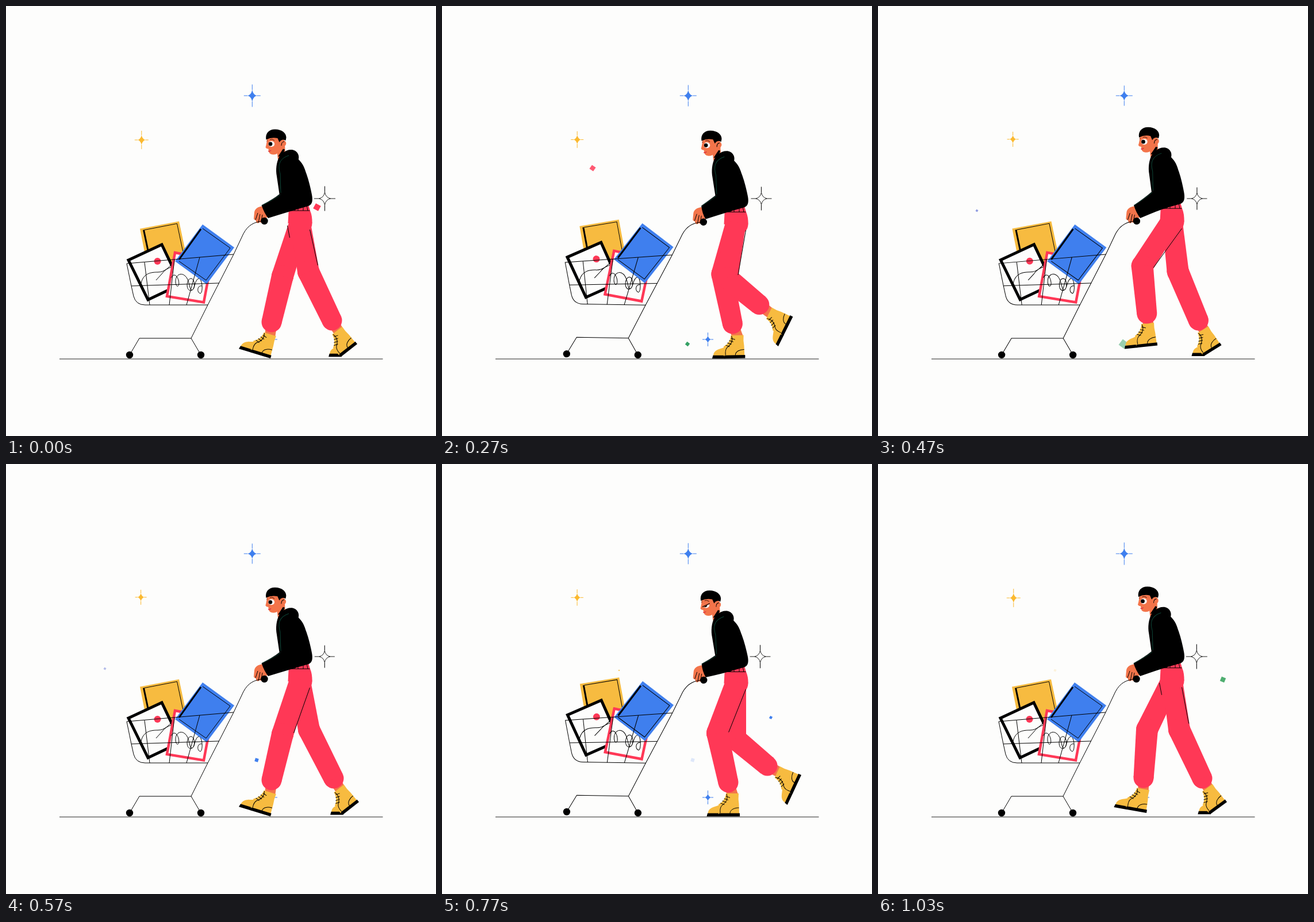
Recreate the animation shown at these times as an HTML page with a canvas. Size 748 px wide and 748 px high, loop 1.06 s.

```html
<!DOCTYPE html>
<html lang="en">
<head>
<meta charset="utf-8">
<title>Walking with a cart</title>
<style>
html, body { margin: 0; width: 100%; height: 100%; overflow: hidden; background: #fdfdfc; }
canvas { display: block; width: 748px; height: 748px; }
</style>
</head>
<body>
<canvas id="stage" width="748" height="748"></canvas>
<script>
const ctx = document.getElementById('stage').getContext('2d');
const LOOP = 1060, FRAMES = 32, STEP = LOOP / FRAMES;
const PAPER = '#fdfdfc', INK = '#000', RED = '#ff3856', BLUE = '#3f7fee',
      YELLOW = '#f7bb40', SKIN = '#f3744a', GREEN = '#35a164', TEAL = '#0d4436';

// Leg cycle: phase, knee x y, cuff x y, heel x y, sole angle
const LEG = [
  [0, 526, 462, 567, 547, 611, 588, -38],
  [1, 527, 462, 570, 547, 614, 588, -38],
  [5, 532, 472, 596, 541, 650, 563, -60],
  [7, 510, 478, 566, 525, 625, 541, -65],
  [11, 455, 441, 510, 509, 561, 540, -50],
  [12, 450, 438, 495, 511, 541, 549, -43],
  [15, 468, 462, 462, 546, 467, 607, 10],
  [16, 481, 470, 462, 550, 460, 613, 17],
  [17, 481, 470, 462, 550, 460, 613, 17],
  [21, 465, 466, 480, 553, 499, 613, 0],
  [23, 479, 468, 498, 554, 518, 613, 0],
  [27, 512, 458, 527, 547, 557, 606, -13],
  [28, 516, 460, 538, 547, 570, 600, -20],
  [31, 524, 462, 564, 547, 607, 588, -36]
];
// Step cycle: phase, body drop, cart push, load lift
const BODY = [
  [0, 0, 0, 0], [1, .3, 0, 0], [5, 10.5, 1, -.6], [7, 5.5, .95, -2.3],
  [11, -7, .5, -.5], [12, -8.3, .35, -.3], [15, -1.3, 0, 0]
];
// Confetti: birth, x, y, half size, turn, colour
const BITS = [
  [-2, 541, 350, 5, .5, RED], [3, 262, 282, 4, .6, RED], [7, 427, 588, 6, .65, GREEN],
  [11, 172, 356, 1.8, .6, '#8f9be0'], [14, 436, 515, 3, .3, BLUE], [19, 572, 441, 2.3, .5, BLUE],
  [22, 308, 359, 2, .4, YELLOW], [28, 600, 375, 4, .4, '#4fae70']
];

// Periodic monotone cubic interpolation
function sample(keys, period, at) {
  const n = keys.length;
  const key = (i, j) => {
    const lap = Math.floor(i / n), row = keys[i - lap * n];
    return j ? row[j] : row[0] + lap * period;
  };
  const slope = (i, j) => (key(i + 1, j) - key(i, j)) / (key(i + 1, 0) - key(i, 0));
  const tangent = (i, j) => {
    const a = slope(i - 1, j), b = slope(i, j);
    return a * b > 0 ? 2 * a * b / (a + b) : 0;
  };
  at %= period;
  let i = n - 1;
  while (keys[i][0] > at) i--;
  const h = key(i + 1, 0) - key(i, 0), s = (at - key(i, 0)) / h, q = 1 - s;
  return keys[0].slice(1).map((_, k) => {
    const j = k + 1;
    return key(i, j) * (1 + 2 * s) * q * q + key(i + 1, j) * (3 - 2 * s) * s * s
      + h * s * q * (q * tangent(i, j) - s * tangent(i + 1, j));
  });
}

function fill(d, color) {
  ctx.fillStyle = color;
  ctx.fill(new Path2D(d));
}
function line(d, width = 1, color = INK) {
  ctx.strokeStyle = color;
  ctx.lineWidth = width;
  ctx.stroke(new Path2D(d));
}
function dot(x, y, r, color = INK) {
  ctx.fillStyle = color;
  ctx.beginPath();
  ctx.arc(x, y, r, 0, 7);
  ctx.fill();
}
function group(draw) {
  ctx.save();
  draw();
  ctx.restore();
}

// Tapered limb with round ends
function limb(x1, y1, r1, x2, y2, r2, color) {
  const a = Math.atan2(y2 - y1, x2 - x1) + Math.PI / 2, c = Math.cos(a), s = Math.sin(a);
  dot(x1, y1, r1, color);
  dot(x2, y2, r2, color);
  fill(`M${x1 + c * r1},${y1 + s * r1}L${x2 + c * r2},${y2 + s * r2}
    L${x2 - c * r2},${y2 - s * r2}L${x1 - c * r1},${y1 - s * r1}Z`, color);
}

// Concave four-point body with thin rays
function star(x, y, w, h, color, outline) {
  const bw = w * .55, bh = h * .52, k = 1.6;
  const body = `M${x},${y - bh}Q${x + k},${y - k} ${x + bw},${y}Q${x + k},${y + k} ${x},${y + bh}
    Q${x - k},${y + k} ${x - bw},${y}Q${x - k},${y - k} ${x},${y - bh}Z`;
  const rays = `M${x},${y - h}V${y - bh}M${x},${y + bh}V${y + h}
    M${x - w},${y}H${x - bw}M${x + bw},${y}H${x + w}`;
  line(rays, outline ? 1.2 : 1, color);
  if (outline) line(body, 1, color);
  else fill(body, color);
}

function sparkles(f) {
  const a = f / FRAMES * 2 * Math.PI, c = Math.cos(a), s = Math.sin(a);
  star(428.3, 156, 14.5, 18.5 + c, BLUE);
  star(235.2 + c * .6, 232.4 + c * .6, 11 + c, 14.5 + c * 1.5, '#fbb92f');
  star(462.5, 580, 9.5, 12, BLUE);
  star(554.5 + s, 335, 18 + c * .5, 20.5 + c, '#222', true);
}

function confetti(f) {
  for (const [birth, x, y, r, turn, color] of BITS) {
    const age = f - birth;
    if (age <= 0 || age >= 10) continue;
    group(() => {
      ctx.globalAlpha = Math.min(1, (10 - age) / 6);
      ctx.translate(x, y);
      ctx.rotate(turn);
      ctx.scale(Math.min(1, age / 2), Math.min(1, age / 2));
      ctx.fillStyle = color;
      ctx.fillRect(-r, -r, 2 * r, 2 * r);
    });
  }
}

// Origin at the heel; the toe cap hinges at x = -36
function shoe(x, y, angle, bend) {
  group(() => {
    ctx.translate(x, y);
    ctx.rotate(angle);
    group(() => {
      ctx.translate(-36, 0);
      ctx.rotate(bend);
      fill('M3,-4V-21C-6,-16 -19,-17 -19.5,-4Z', YELLOW);
      fill('M2,-5.5H-20L-21.5,0H1Z', INK);
    });
    fill('M-1,-4L-1.5,-22Q-3,-30 -2,-40L-24,-40C-25,-32 -29,-25 -37,-21V-4Z', YELLOW);
    fill('M0,-5.5H-36V0H0Z', INK);
    line('M-17,-5C-17,-12 -9,-15 -1.5,-15M-23,-39C-20,-30 -24,-24 -31,-19Q-35,-15 -34,-6');
    for (let i = 0; i < 4; i++) line(`M${-24 - i * 3.2},${-35 + i * 4}l7,2.5`);
  });
}

function leg(phase, drop, near) {
  const [kx, ky, cx, cy, hx, hy, deg] = sample(LEG, FRAMES, phase);
  const angle = deg * Math.PI / 180, hipY = 374 + drop * .7;
  const planted = phase > 20 ? 1 : Math.max(0, Math.min(1, (5 - phase) / 4));
  const c = Math.cos(angle), s = Math.sin(angle);
  limb(cx, cy, 10, hx - 12 * c + 37 * s, hy - 12 * s - 37 * c, 9, SKIN);
  shoe(hx, hy, angle, -angle * planted);
  limb(511.5, hipY, 17.5, kx, ky, 19, RED);
  limb(kx, ky, 19, cx, cy, 17.5, RED);
  if (!near) return;
  const len = Math.hypot(kx - 511.5, ky - hipY), ux = (kx - 511.5) / len, uy = (ky - hipY) / len;
  line(`M528.5,${389 + drop * .5}L${kx + uy * 18 - ux * 8},${ky - ux * 18 - uy * 8}`);
  if (kx > 505) line(`M489.5,${382 + drop}L493.5,${403 + drop}`);
}

function head(drop) {
  fill('M471,250L473,267L486,260L485,240Z', SKIN);
  fill('M473,262L482,248.5L485,249.5Q483,257 478,261Z', INK);
  fill('M454,226C454,236 453,241 451.5,246Q453,248.5 456.5,248.5Q456,258 464.5,258.5Q472,258.5 475,253L484,238V226Z', SKIN);
  dot(481.5, 239, 5.8, SKIN);
  fill('M452.5,232.5C450.5,222 457,214.5 468,214.5C480,214.5 487.5,221 487.5,229L486.5,234Q482,231 478,234L475.5,237L472.5,230Q462,227.5 452.5,232.5Z', INK);
  line('M479,243Q479,236 484,236');
  line('M456,252.5Q459,253.5 461,251', 1.2, '#d61f3d');
  line('M453.5,235L455,234M459,232.5Q463,230.5 467,234', 1, '#54200f');
  ctx.fillStyle = '#fff';
  ctx.beginPath();
  ctx.ellipse(461.8, 240, 5.4, 5, 0, 0, 7);
  ctx.fill();
  dot(460, 240, 3.4);
  if (drop > 3) {
    fill('M455,234H468.5V238L455,244Z', SKIN);
    line('M455,243L468,237', 1.2);
  }
}

function hoodie(drop, push) {
  group(() => {
    const lean = .0035 * drop;
    ctx.transform(1, 0, lean, 1, -lean * 350, drop);
    head(drop);
    fill('M476,261C470,272 469,285 471,296L476,330L492,356L501,355L526,348C534,345 533.5,336 532,328C529,312 525,298 521.5,289C518,277 514,272 508,266Z', INK);
    fill('M473,270C476,258 485,250 496,250C506,250 512,260 508,269Q494,277 473,270Z', INK);
    line('M492,260C474,266 473,278 477,292L478,325', 1, TEAL);
  });
  const cx = 444.5 + 7.5 * push, cy = 346.5 + push;
  fill(`M${cx},${cy}Q465,${336 + drop * .8} 476,${327 + drop}L503,${325 + drop}L505,${354 + drop}
    Q485,${360 + drop} ${456 + 3 * push},${369 + 2 * push}Q${449 + 4 * push},${360 + push} ${cx},${cy}Z`, INK);
  line(`M${cx + 1},${cy}Q466,${337 + drop * .8} 477,${328 + drop}`, 1, TEAL);
}

function hand(push) {
  group(() => {
    ctx.translate(6 * push, 2 * push);
    fill('M447,348C439,349 433,352 432,359L431,370Q432,373 434,372L436,377Q439,379 441,376Q445,378 447,374L456,366Z', SKIN);
    line('M438,360L434,372M442,362L439,377M446,363L444,375');
  });
}

function person(f, drop, push) {
  const near = f % FRAMES, far = (f + FRAMES / 2) % FRAMES, hip = 378 + drop * .7;
  leg(far, drop, false);
  fill(`M492,${350 + drop}L526,${346 + drop}L529,${356 + drop}Q533,${365 + drop} 532.5,${hip}L490.5,${hip}Z`, RED);
  dot(514, hip, 18.5, RED);
  leg(near, drop, true);
  const y = 356 + drop;
  line(`M492,${y}H528.5M502,${y}v-7M508,${y}v-7M517,${y}v-8M525,${y}l-2,-9`);
  hand(push);
  hoodie(drop, push);
}

function load() {
  fill('M233,387.5L301,374.5L316,445L247,458Z', YELLOW);
  line('M241,389.5L297.5,378.5L309,433');
  line('M239.5,389.5L248,430', 3);

  const card = 'M213,442L271,415L304,484L247,511Z';
  fill(card, PAPER);
  line(card, 5);
  dot(263.5, 444, 6, RED);
  line('M235,482C239,465 252,463 264,463C276,463 283,455 290,447M261,477L271,466Q278,456 289,454');

  const sheet = 'M294,429L358,441L344,515.5L280,505Z';
  fill(sheet, PAPER);
  line(sheet, 4.5, RED);
  line('M287,473C291,465 297,467 300,477C303,489 296,491 295,481C294,468 304,463 311,469C319,475 319,492 322,494C329,496 330,475 322,474C314,474 312,494 321,495C330,495 327,477 335,474C342,474 343,499 338,500C331,498 333,485 341,487');

  fill('M342,380L397,420L349,484L294,444Z', BLUE);
  line('M342,387L390,421L348,477L301,444');
  line('M339,388L301,441', 3);
}

function cart(push, lift) {
  group(() => {
    ctx.translate(339 + 2 * push, 607);
    ctx.rotate(.0175 * push);
    ctx.translate(-339, -607);
    group(() => {
      ctx.translate(340, 516 + lift);
      ctx.rotate(.01 * push);
      ctx.translate(-340, -516);
      load();
    });
    line('M215,607L232,578H322L339,607M322,578L351,520L396,432L413,396C421,381 432,375 449,374');
    line('M396,432L210,448L218,487L222,505Q226,520 242,520H351M218,487L371,482M241,446L250,520M293,441L284,520M337,437L314,520');
    dot(215, 607, 6.2);
    dot(339, 607, 6.2);
    dot(449.5, 374, 6.2);
  });
}

function draw(now) {
  const f = Math.floor((now % LOOP + 5) / STEP) % FRAMES;
  const [drop, push, lift] = sample(BODY, FRAMES / 2, f);
  ctx.fillStyle = PAPER;
  ctx.fillRect(0, 0, 748, 748);
  sparkles(f);
  confetti(f);
  line('M93,614H655.5', 1.1, '#222');
  person(f, drop, push);
  cart(push, lift);
}

const start = performance.now();
function tick() {
  draw(performance.now() - start);
  requestAnimationFrame(tick);
}
tick();
</script>
</body>
</html>
```
